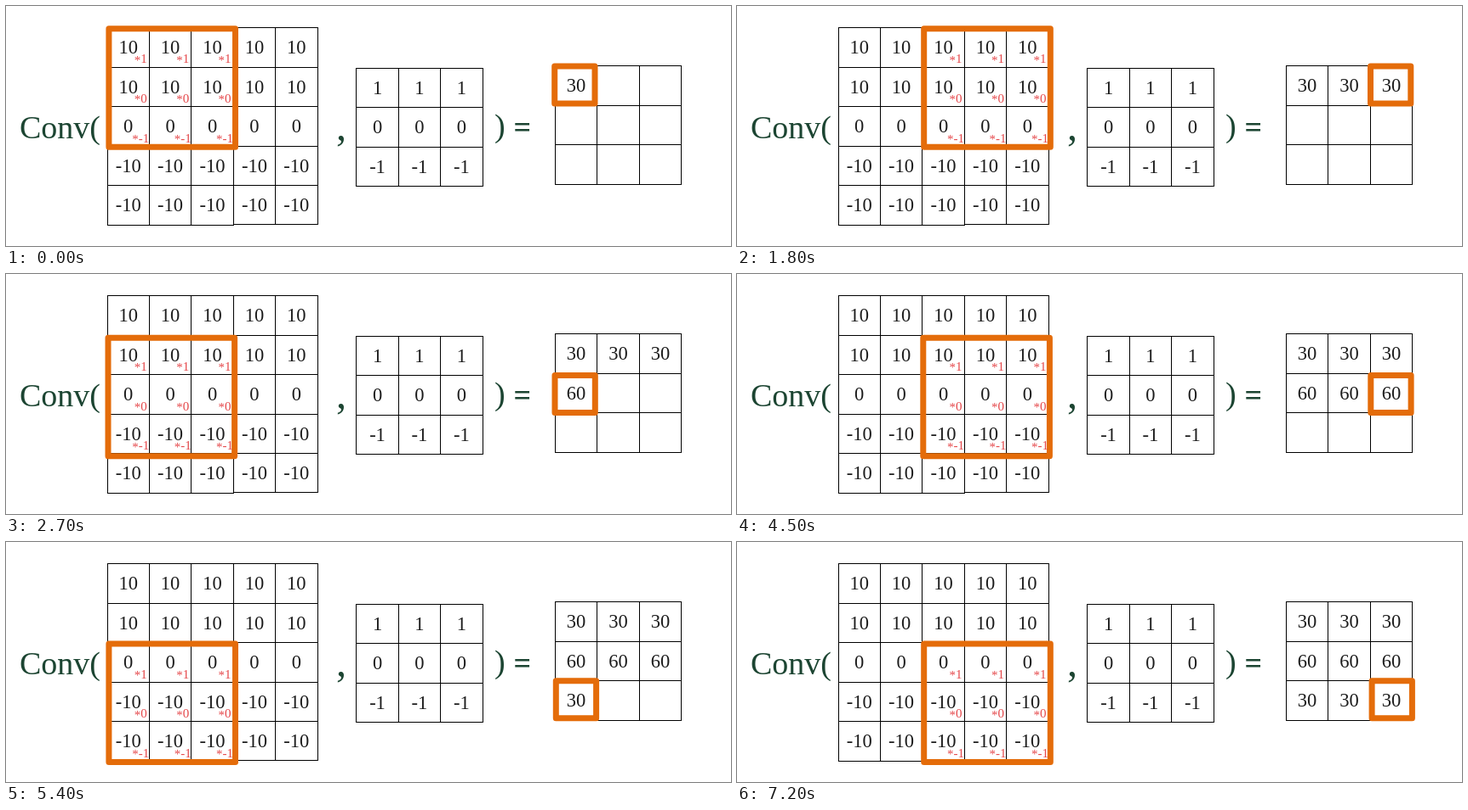
These frames come from a looping animation (852 by 283 pixels, 8 s). An HTML page with a canvas:

```html
<!DOCTYPE html>
<html lang="en">
<head>
<meta charset="utf-8">
<title>Convolution</title>
<style>
  html, body { margin: 0; width: 100%; height: 100%; overflow: hidden; background: #fff; }
  canvas { display: block; }
</style>
</head>
<body>
<canvas id="stage" width="852" height="283"></canvas>
<script>
const ctx = document.getElementById("stage").getContext("2d");
const LOOP = 8000, STEP = 900;
const CELL_W = 49.4, CELL_H = 46.6;
const SERIF = '"Liberation Serif", "Times New Roman", serif';
const INK = "#1c1c1c", GREEN = "#1c4532", RED = "#e5484b", ORANGE = "#e46c0a";

const inputRows = [10, 10, 0, -10, -10];
const kernelRows = [1, 0, -1];
const input = { x: 118.6, y: 25, size: 5 };
const kernel = { x: 411.4, y: 72.6, size: 3 };
const output = { x: 645, y: 70.1, size: 3 };

// Placement of the two frames for each row of the result
const rowLayout = [
  { x: 120.9, y: 26.7, outX: 644.7, outY: 71 },
  { x: 120, y: 75.2, outX: 645, outY: 119.5 },
  { x: 120.9, y: 120, outX: 646.3, outY: 163.8 }
];

function text(value, x, y, size, color, align = "center", weight = "normal") {
  ctx.font = `${weight} ${size}px ${SERIF}`;
  ctx.fillStyle = color;
  ctx.textAlign = align;
  ctx.fillText(String(value), x, y);
}

function line(x1, y1, x2, y2) {
  ctx.fillStyle = "#000";
  ctx.fillRect(x1, y1, x2 - x1 + 1, y2 - y1 + 1);
}

function grid({ x, y, size }) {
  const colX = i => Math.round(x + i * CELL_W);
  const rowY = i => Math.round(y + i * CELL_H);
  for (let i = 0; i <= size; i++) {
    // The last two columns of the input end one pixel higher
    const lift = size === 5 && i === size ? 1 : 0;
    line(colX(0), rowY(i), colX(3), rowY(i));
    line(colX(3), rowY(i) - lift, colX(size), rowY(i) - lift);
    line(colX(i), rowY(0), colX(i), rowY(size) - (i > 3 ? 1 : 0));
  }
}

function center(table, row, col) {
  return [table.x + (col + 0.5) * CELL_W, table.y + (row + 0.5) * CELL_H];
}

function fill(table, valueAt) {
  for (let row = 0; row < table.size; row++)
    for (let col = 0; col < table.size; col++) {
      const [x, y] = center(table, row, col);
      text(valueAt(row, col), x + 0.4, y + 7.7, 22.5, INK);
    }
}

function convolve(row) {
  return 3 * kernelRows.reduce((sum, k, i) => sum + k * inputRows[row + i], 0);
}

function frameBox(x, y, w, h) {
  ctx.strokeStyle = ORANGE;
  ctx.lineWidth = 7;
  ctx.lineJoin = "round";
  ctx.strokeRect(x, y, w, h);
}

function multiplier(value, x, y) {
  ctx.font = `15px ${SERIF}`;
  const star = ctx.measureText("*").width;
  const left = x - ctx.measureText("*" + value).width / 2;
  text("*", left, y + 1.5, 15, RED, "left");
  text(value, left + star, y, 15, RED, "left");
}

function draw(step) {
  const row = Math.floor(step / 3), col = step % 3;
  const layout = rowLayout[row];
  ctx.fillStyle = "#fff";
  ctx.fillRect(0, 0, 852, 283);

  text("Conv(", 16, 156, 38, GREEN, "left");
  text(",", 388, 158, 48, GREEN, "left");
  text(")", 574, 154, 38, GREEN, "left");
  text("=", 596.5, 155, 36, GREEN, "left", "bold");

  [input, kernel, output].forEach(grid);
  fill(input, r => inputRows[r]);
  fill(kernel, r => kernelRows[r]);
  fill(output, (r, c) => r * 3 + c <= step ? convolve(r) : "");

  frameBox(layout.x + col * CELL_W, layout.y, 148.6, 139.5);
  frameBox(layout.outX + col * 49.9, layout.outY, 47.3, 44);

  for (let i = 0; i < 3; i++)
    for (let j = 0; j < 3; j++) {
      const [x, y] = center(input, row + i, col + j);
      multiplier(kernelRows[i], x + 15, y + 19);
    }
}

const start = performance.now();
function tick() {
  const time = (performance.now() - start) % LOOP;
  draw(Math.floor(time / STEP));
  requestAnimationFrame(tick);
}
tick();
</script>
</body>
</html>
```
